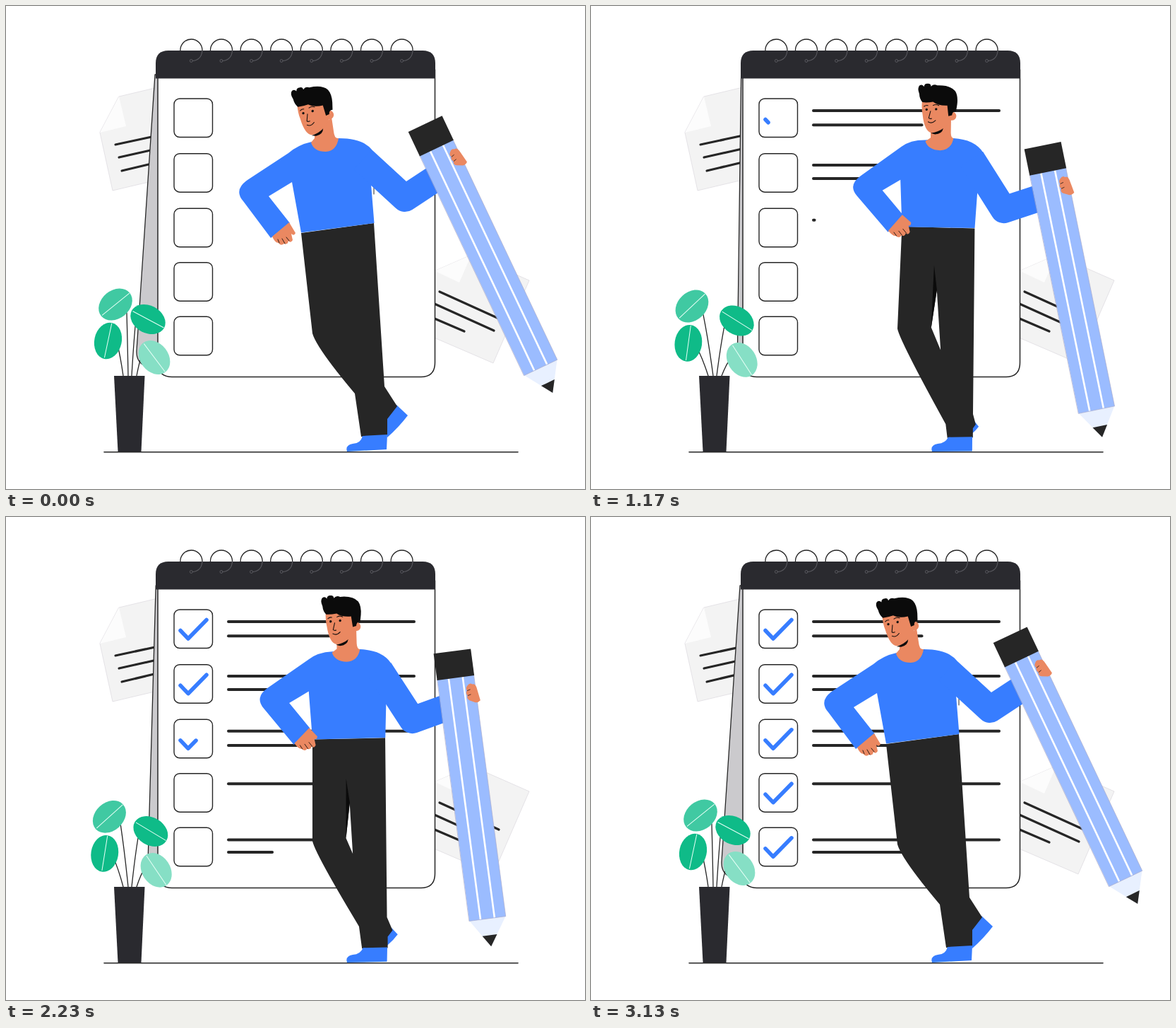
Write an HTML page that moves like this. It is 820 px wide and 683 px high and loops after 3.21 s.

```html
<!DOCTYPE html>
<html lang="en">
<head>
<meta charset="utf-8">
<title>Checklist</title>
<style>
  html, body { margin: 0; width: 100%; height: 100%; overflow: hidden; background: #fff; }
  svg { display: block; width: 100%; height: 100%; }
</style>
</head>
<body>
<svg id="stage" viewBox="0 0 820 683" fill="none" stroke-linecap="round" stroke-linejoin="round">
  <g id="papers" stroke-width=".7">
    <path d="M160 128L240 109V240L151 261L133 179Z" fill="#f3f3f3" stroke="#dcd8de"/>
    <path d="M160 128L170 170L133 179Z" fill="#fcfcfc"/>
    <path d="M155 196L225 181M160 214L225 199.500M164 233L225 218.500" stroke="#262626" stroke-width="3.200"/>
    <path d="M590 382L659 352L741 388L690 505L590 462Z" fill="#f3f3f3" stroke="#dcd8de"/>
    <path d="M590 382L659 352L642 391L608 375Z" fill="#fcfcfc"/>
    <path d="M614 404L698 442M600 418L691 459M600 439L649 460" stroke="#262626" stroke-width="3.200"/>
  </g>
  <path id="panel" fill="#cbcacd" stroke="#262626" stroke-width="1.300"/>
  <path d="M215 90V504Q215 524.400 235 524.400H588Q607.500 524.400 607.500 504V90Z" fill="#fff" stroke="#262626" stroke-width="1.500"/>
  <path d="M212 102.500V81Q212 63 230 63H590Q608 63 608 81V102.500Z" fill="#2a2a2f"/>
  <g id="rings"></g>
  <g id="boxes" stroke="#262626" stroke-width="1.400"></g>
  <g id="lines" stroke="#262626" stroke-width="4"></g>
  <g id="checks" stroke="#377dff" stroke-width="5.500"></g>
  <path d="M139 630.700H725" stroke="#262626" stroke-width="1.600"/>

  <g id="plant"></g>
  <path d="M153 523H196.500L191.500 630H158.500Z" fill="#2a2a2f"/>

  <path id="backShoe" fill="#377dff"/>
  <path id="trousers" fill="#262626" fill-rule="evenodd"/>
  <path id="crease" fill="#0b0b0b"/>
  <path id="shoe" fill="#377dff"/>
  <path id="seam" stroke="#262626" stroke-width="1"/>
  <path id="sweater" fill="#377dff"/>
  <path id="arm" stroke="#377dff" stroke-width="38" stroke-linecap="butt"/>
  <path id="neck" fill="#ea8861"/>
  <g id="head">
    <circle cx="522" cy="156" r="6.200" fill="#ea8861"/>
    <path d="M481 130Q479 143 480.500 152Q482 176 492 178.500Q505 178 512 172L522 160V132Z" fill="#ea8861"/>
    <path d="M491 179Q502 178 509 173Q507 181 497 181Z" fill="#0b0b0b"/>
    <path d="M477 123Q474 114 478 111Q482 109 484 113Q485 108 490 109Q494 109 494 113Q498 109 503 112Q521 112 528 121Q532 128 530 140L528 150Q523 149 522 155L517 156L516 141Q503 141 496 135Q488 136 481 135Q477 130 477 123Z" fill="#0b0b0b"/>
    <g stroke="#1a1210" stroke-width="1.100">
      <path d="M483 141Q486 139 488.500 140M496 140Q500 138 504 140.500M492 148L489 157.500Q490 159 493 158.500M488 163Q493 166.500 498.500 161.500"/>
      <g fill="#111" stroke="none"><circle cx="486.500" cy="145.500" r="1.700"/><circle cx="500" cy="145.500" r="1.700"/></g>
    </g>
  </g>
  <path id="leftHand" fill="#ea8861"/>
  <path id="fingers" stroke="#1a1210" stroke-width=".9"/>

  <g id="pencil">
    <path d="M-26 381H26L0 421Z" fill="#e8f0ff"/>
    <path d="M-10.500 405H10.500L0 421Z" fill="#262626"/>
    <path d="M-26 37H26V381.500H-26Z" fill="#9bbcff" stroke="#a9a9c8" stroke-width=".6"/>
    <path d="M-10 38V381M10 38V381" stroke="#fff" stroke-width="2.600" stroke-linecap="butt"/>
    <path d="M-26.500 0H26.500V38H-26.500Z" fill="#262626"/>
    <path d="M15 51Q19 47 22 50Q26 49 27.500 55L30.500 74Q27 77 23 76L15 72Q11 69 13.500 65Q10.500 61 13.500 58Q11.500 54 15 51Z" fill="#ea8861"/>
    <path d="M14 58L18 57M14 65L18 64" stroke="#1a1210" stroke-width=".7"/>
  </g>
</svg>
<script>
const LOOP = 3210;
const $ = id => document.getElementById(id);
const add = (parent, tag, attrs) => {
  const el = document.createElementNS('http://www.w3.org/2000/svg', tag);
  for (const key in attrs) el.setAttribute(key, attrs[key]);
  return parent.appendChild(el);
};
const lerp = (a, b, k) => a + (b - a) * k;
const clamp = x => Math.min(1, Math.max(0, x));
const ease = (t, from, to) => (1 - Math.cos(Math.PI * clamp((t - from) / (to - from)))) / 2;

// Blend two paths that share the same commands.
const blend = ([a, b], k) => {
  const ends = b.match(/[\d.]+/g);
  let i = 0;
  return a.replace(/[\d.]+/g, n => lerp(+n, +ends[i++], k).toFixed(2));
};

// Each pair: leaning left, standing upright.
const poses = {
  panel: ['M211 97L185 487Q184 504 198 509L236 524V97Z', 'M213 97L212 487Q212 504 216 510L236 524V97Z'],
  backShoe: ['M537 583L553 564L569 579Q556 596 540 610Z', 'M538 592L541 592L545 598Q543 601 540 603Z'],
  trousers: ['M418 321L521 307L536 538L554 566L540 584L540 607L503 609L494 548Q440 484 434 463Z',
             'M445 310L548 316L542 585L543 597L541 600L541 611L505 611L504 600Q436 470 434 455Z'],
  shoe: ['M483 630Q480 621 491 619Q502 619 505 608L540 606L539 627Z',
         'M483 630Q480 621 491 619Q502 618 506 610L540 610L540 630Z'],
  sweater: ['M433 192Q414 196 400 208L342 246Q322 260 336 276L375 328L402 307L372 269L405 249L418 320.5L521.5 307L517 252L518 203Q505 187 471 187Z',
            'M482 189Q460 188 448 197L390 239Q372 252 385 267L430 318L450 293L421 259L445 245L445 310.5L548 315.5L553 270L563 208Q551 189 522 187Z'],
  neck: ['M437 182L437 187L432 193Q436 206 453 206Q468 205 471 187Q465 188 464 177L461 157Z',
         'M490 177L490 186L482 191Q486 203 503 204Q519 203 522 187Q519 186 519 180L520 159Z'],
  leftHand: ['M377 326L401 306L410 321Q408 326 404 322L406 331Q403 336 400 332Q399 338 394 336Q389 340 386 335Q381 335 377 326Z',
             'M430 316L449 293L462 303Q463 308 459 308L461 317Q459 322 455 319Q454 324 449 322Q446 327 441 323Q437 324 430 316Z'],
  fingers: ['M385 330L387 335M391 329L395 336M397 327L401 332', 'M438 318L442 323M445 316L450 322M451 313L456 319'],
  seam: ['M521 254V266', 'M557 272V284'],
};
const gap = ['M481.5 409L481 453L484.5 459Z', 'M492 400L482 455L498 494Z'];
const crease = ['M474.5 376L481 455L482 408Z', 'M489 364L482 455L492 400Z'];

// Centre, tilt, colour and stem of each leaf; dx, dy is its sway.
const leaves = [
  { x: 155, y: 422, dx: -14.5, dy: 3, tilt: -39, ry: 20, fill: '#40c9a2', stem: [173, 16, 12] },
  { x: 201, y: 443, dx: 6.5, dy: 2.5, tilt: 28, ry: 19.5, fill: '#0fbb88', stem: [178, -18, 10] },
  { x: 144.5, y: 473.5, dx: -8, dy: 4, tilt: -78, ry: 19.3, fill: '#0fbb88', stem: [166, 15, 12] },
  { x: 210, y: 497, dx: 4.5, dy: 4, tilt: 53, ry: 20, fill: '#86dfc5', stem: [185, -20, 4] },
];
for (const leaf of leaves) leaf.line = add($('plant'), 'path', { stroke: '#262626', 'stroke-width': 1.3 });
for (const leaf of leaves) {
  leaf.group = add($('plant'), 'g', {});
  add(leaf.group, 'ellipse', { rx: 26, ry: leaf.ry, fill: leaf.fill });
  add(leaf.group, 'path', { d: 'M-24 0H25', stroke: '#e6fff6', 'stroke-width': 1 });
}

for (let i = 0; i < 8; i++) {
  const x = 262.4 + i * 42.6;
  add($('rings'), 'path', { d: `M${x - 15.5} 62.500a15.500 15.500 0 0 1 31 0`, stroke: '#262626', 'stroke-width': 1.4 });
  add($('rings'), 'path', { d: `M${x + 15.5} 63q-1 13-13 14.500`, stroke: '#59595f', 'stroke-width': 1.1 });
  add($('rings'), 'circle', { cx: x, cy: 77.5, r: 2, stroke: '#59595f', 'stroke-width': 1 });
}

const checkStarts = [1130, 1580, 2010, 2445, 2750];
const checks = [131, 208.7, 286.3, 362.7, 439.3].map((y, i) => {
  add($('boxes'), 'rect', { x: 238, y, width: 54.5, height: 54.5, rx: 8 });
  const el = add($('checks'), 'path', { d: `M247 ${y + 29.5}L258 ${y + 41}L284 ${y + 14.5}` });
  return { el, start: checkStarts[i], length: el.getTotalLength() };
});

const LONG = 263, SHORT = 153.5;
const lines = [
  [148, LONG, 120, .31], [168.300, SHORT, 373, .236],
  [225, LONG, 640, .31], [244, SHORT, 885, .236],
  [302.800, LONG, 1166, .31], [323, SHORT, 1413, .236],
  [377.300, LONG, 1631, .31], [456.500, LONG, 1826, .348], [474, SHORT, 1968, .236],
].map(([y, length, start, speed]) => ({ el: add($('lines'), 'path', {}), y, length, start, speed }));

function draw(t) {
  const s = t < 1580 ? ease(t, 0, 1605) : 1 - ease(t, 1580, 3060);
  const angle = t < 1625
    ? 25.4 + 2.8 * ease(t, 0, 590) - 29.7 * ease(t, 645, 1622)
    : -1.5 + 26.9 * ease(t, 1634, 3150);

  for (const id in poses) $(id).setAttribute('d', blend(poses[id], s));
  const open = clamp((s - .2) / .8);
  if (s > .2) $('trousers').setAttribute('d', blend(poses.trousers, s) + blend(gap, open));
  $('crease').setAttribute('d', blend(crease, open));
  $('crease').setAttribute('opacity', clamp(s * 10 - 1));
  $('seam').setAttribute('opacity', clamp(2 - s * 4));
  $('head').setAttribute('transform',
    `translate(${lerp(446, 503, s)} ${lerp(186.4, 185, s)}) rotate(${-13 * (1 - s)}) translate(-503 -185)`);

  // How far the pencil lags behind the body.
  const lag = angle - (25.4 - 26.9 * s);
  const hand = { x: 641 + 34 * s + 14 * s * s * (1 - s) + .4 * lag, y: 214 + 57 * s - .8 * lag };
  $('pencil').setAttribute('transform', `translate(${hand.x} ${hand.y}) rotate(${-angle}) translate(-22.5 -63)`);
  $('arm').setAttribute('d', `M${lerp(505, 546, s)} ${lerp(217, 216, s)}`
    + `L${lerp(565, 584, s) + .45 * lag} ${lerp(272, 296, s) - .45 * lag}`
    + `L${hand.x - 18} ${hand.y + 20 - 12 * s}`);

  for (const leaf of leaves) {
    const x = leaf.x + leaf.dx * s, y = leaf.y + leaf.dy * s;
    const [root, dx, dy] = leaf.stem;
    leaf.group.setAttribute('transform', `translate(${x} ${y}) rotate(${leaf.tilt + Math.sign(leaf.dx) * 5 * s})`);
    leaf.line.setAttribute('d', `M${root} 523Q${lerp(root, x + dx, .45)} ${lerp(523, y + dy, .55)} ${x + dx} ${y + dy}`);
  }

  for (const { el, y, length, start, speed } of lines) {
    const shown = Math.min(length, (t - start) * speed);
    el.setAttribute('d', shown > 0 ? `M315 ${y}h${shown}` : '');
  }
  for (const { el, start, length } of checks) {
    const k = clamp((t - start) / 370);
    el.setAttribute('visibility', k > 0 ? 'visible' : 'hidden');
    el.setAttribute('stroke-dasharray', `${length * k} 100`);
  }
}

const begin = performance.now();
function tick() {
  draw((performance.now() - begin) % LOOP);
  requestAnimationFrame(tick);
}
tick();
</script>
</body>
</html>
```
